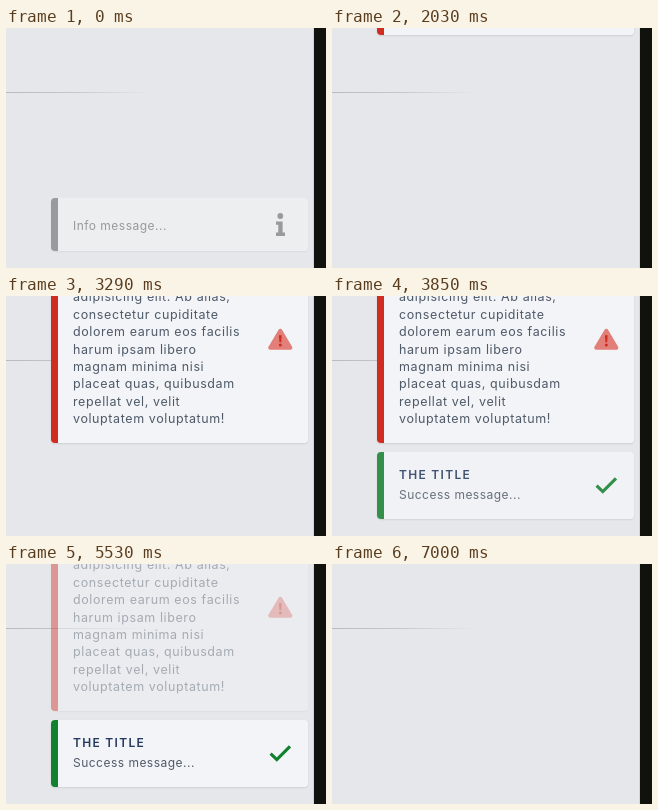
Animation, 320 px wide and 240 px high, one loop 7.42 s. Source, as an HTML page:

```html
<!DOCTYPE html>
<html lang="en">
<head>
<meta charset="utf-8">
<title>Toast messages</title>
<style>
  html, body { margin: 0; width: 100%; height: 100%; overflow: hidden; }
  body { background: #e5e7eb; }

  .stage { position: relative; width: 320px; height: 240px; overflow: hidden; }

  .rule {
    position: absolute; left: 0; top: 64px; width: 145px; height: 1px;
    background: linear-gradient(90deg, #b9bbbf, #c3c5c8 42%, #e5e7eb);
  }

  .edge {
    position: absolute; left: 308px; top: 0; width: 12px; height: 240px;
    background: #11120d; box-shadow: -1px 0 #d3d5d8;
  }

  .toast {
    --loop: 7420ms infinite;
    position: absolute; left: 45px; bottom: 17px; width: 257px; height: 53px;
    box-sizing: border-box; padding: 3px 0 0 22px;
    display: flex; flex-direction: column; justify-content: center;
    border-radius: 4px; overflow: hidden;
    background: linear-gradient(90deg, var(--tone) 7px, #f3f4f7 7px);
    font: 400 12px/17.4px Inter, "Open Sans", sans-serif;
    letter-spacing: .48px; color: #4f5a69; white-space: pre;
    box-shadow: 0 1px 2px rgba(0, 0, 0, .1);
  }

  .toast svg {
    position: absolute; left: 216px; top: 50%; width: 28px; height: 28px;
    margin-top: -14px; fill: var(--tone);
  }

  .info    { --tone: #465d82; animation: info-fade var(--loop), info-move var(--loop) step-end; }
  .warning { --tone: #d02c20; animation: warning-fade var(--loop), warning-move var(--loop) step-end; }
  .error   { --tone: #d02c20; height: 208px; font-size: 12.5px; letter-spacing: .6px;
             animation: error-fade var(--loop), error-move var(--loop) step-end; }
  .success { --tone: #12812f; height: 67px; padding: 0 0 2px 22px; animation: success-fade var(--loop); }
  .success svg { margin-top: -14.5px; }

  .title { font-weight: 600; line-height: 20px; letter-spacing: 1.3px; color: #24395f; position: relative; top: -1px; }

  @keyframes info-fade {
    0% { opacity: .55; filter: grayscale(1); animation-timing-function: ease-out; }
    4.717%, 27.35% { opacity: 1; filter: grayscale(0); animation-timing-function: step-end; }
    27.36%, 100% { opacity: 0; }
  }
  @keyframes info-move {
    0% { transform: none; }
    7.54%, 100% { transform: translateY(-61px); }
  }

  @keyframes warning-fade {
    0%, 7.547% { opacity: 0; animation-timing-function: ease-in-out; }
    24.259%, 44.33% { opacity: 1; animation-timing-function: step-end; }
    44.34%, 100% { opacity: 0; }
  }
  @keyframes warning-move {
    0% { transform: none; }
    27.35%, 100% { transform: translateY(-216px); }
  }

  @keyframes error-fade {
    0%, 27.358% { opacity: 0; animation-timing-function: ease-out; }
    33.962%, 70.755% { opacity: 1; animation-timing-function: linear; }
    77.358%, 100% { opacity: 0; }
  }
  @keyframes error-move {
    0% { transform: none; }
    44.33%, 100% { transform: translateY(-76px); }
  }

  @keyframes success-fade {
    0%, 44.34% { opacity: 0; animation-timing-function: ease-in-out; }
    54.717%, 88.679% { opacity: 1; animation-timing-function: linear; }
    94.34%, 100% { opacity: 0; }
  }
</style>
</head>
<body>
<div class="stage">
  <div class="rule"></div>
  <div class="edge"></div>

  <div class="toast info">
    <div>Info message...</div>
    <svg viewBox="0 0 28 28">
      <circle cx="13.3" cy="5" r="2.9"/>
      <path d="M9 10.4h6.6v11.2H18v3.4H9v-3.4h2.3v-7.8H9z"/>
    </svg>
  </div>

  <div class="toast warning">
    <div>Warning message...</div>
    <svg viewBox="0 0 28 28">
      <path d="M9.8 3.2q0-1 1-1h5q1 0 1 1l-1 12.8q-.1 1-1 1h-3q-.9 0-1-1z"/>
      <circle cx="13.3" cy="22" r="3.3"/>
    </svg>
  </div>

  <div class="toast error">
    <div>Lorem ipsum dolor sit
amet, consectetur
adipisicing elit. Ab alias,
consectetur cupiditate
dolorem earum eos facilis
harum ipsam libero
magnam minima nisi
placeat quas, quibusdam
repellat vel, velit
voluptatem voluptatum!</div>
    <svg viewBox="0 0 28 28">
      <path d="M3.2 22.8L13.3 5.8L23.4 22.8z" fill="#e27f78" stroke="#e27f78" stroke-width="4" stroke-linejoin="round"/>
      <path d="M11.9 10.2h2.8l-.5 7h-1.8z"/>
      <circle cx="13.3" cy="20" r="1.5"/>
    </svg>
  </div>

  <div class="toast success">
    <div class="title">THE TITLE</div>
    <div>Success message...</div>
    <svg viewBox="0 0 28 28">
      <path d="M3.6 14.6L9.8 20.6L23 7.4" fill="none" stroke="#12812f" stroke-width="3.2"/>
    </svg>
  </div>
</div>
</body>
</html>
```
